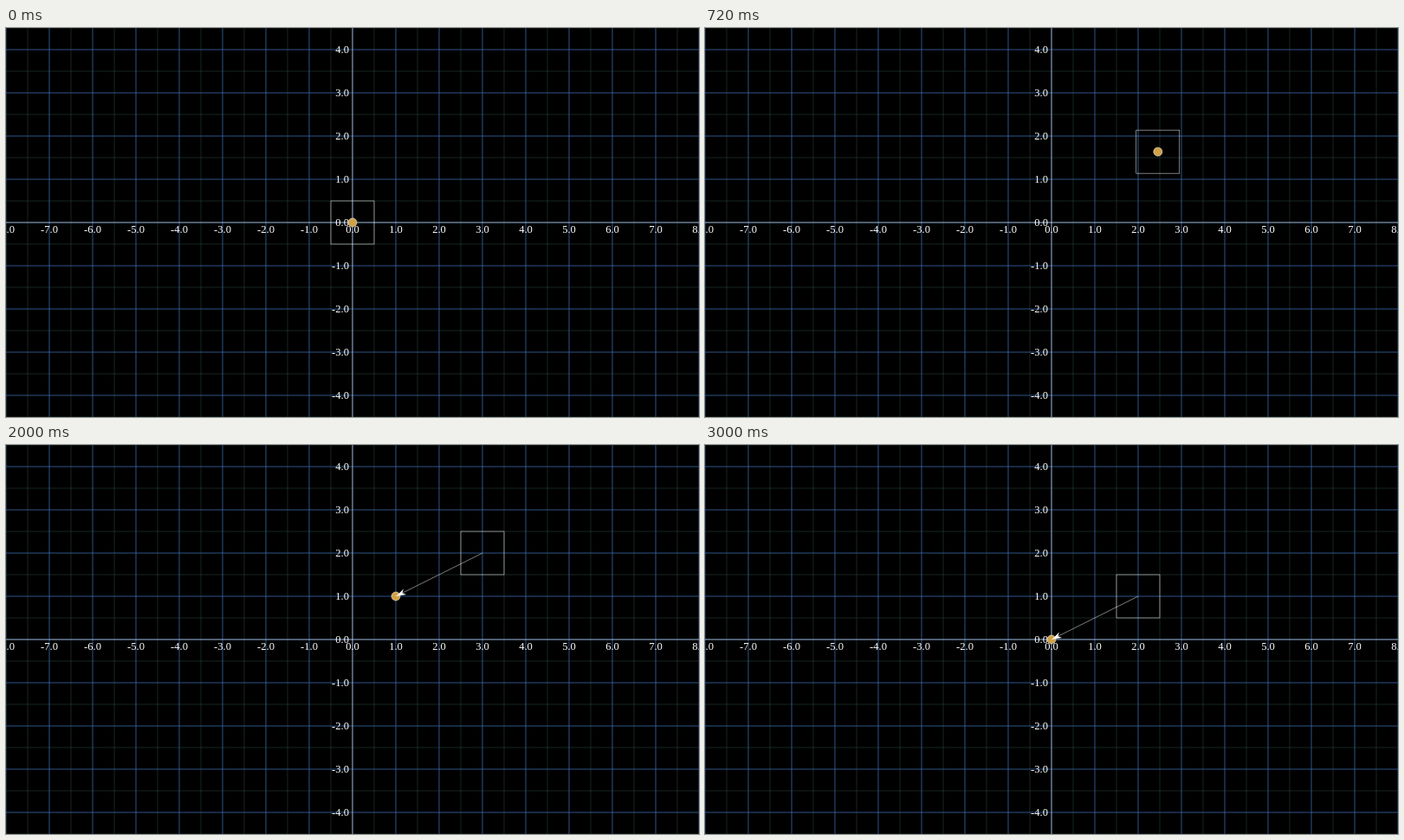
Write an HTML page with a canvas that moves like this. It is 800 by 450 pixels and loops after 4000 ms.

```html
<!DOCTYPE html>
<html lang="en">
<head>
<meta charset="utf-8">
<title>Moving frames on a grid</title>
<style>
  html, body { margin: 0; width: 100%; height: 100%; overflow: hidden; background: #000; }
  canvas { display: block; }
</style>
</head>
<body>
<canvas id="stage" width="800" height="450"></canvas>
<script>
const ctx = document.getElementById("stage").getContext("2d");
const WIDTH = 800, HEIGHT = 450, UNIT = 50, LOOP = 4000, PHASE = 1000, STEP = 20;
const START = [0, 0], CORNER = [3, 2], OFFSET = [-2, -1], RETURN = [-1, -1];
const THIN = 0.5;

const toScreen = ([x, y]) => [WIDTH / 2 + x * UNIT, HEIGHT / 2 - y * UNIT];
const add = (p, q, amount) => [p[0] + q[0] * amount, p[1] + q[1] * amount];

// Eased progress of one of the three consecutive phases.
function progress(time, phase) {
  const t = Math.min(1, Math.max(0, time / PHASE - phase));
  return (1 - Math.cos(Math.PI * t)) / 2;
}

function line(x1, y1, x2, y2, color) {
  ctx.strokeStyle = color;
  ctx.lineWidth = THIN;
  ctx.beginPath();
  ctx.moveTo(x1, y1);
  ctx.lineTo(x2, y2);
  ctx.stroke();
}

function gridLines(spacing, color) {
  for (let x = 0; x <= WIDTH; x += spacing) line(x, 0, x, HEIGHT, color);
  const top = (HEIGHT / 2) % spacing;
  for (let y = top; y <= HEIGHT; y += spacing) line(0, y, WIDTH, y, color);
}

function drawGrid() {
  ctx.fillStyle = "#000";
  ctx.fillRect(0, 0, WIDTH, HEIGHT);
  gridLines(UNIT / 2, "#2c4c44");
  gridLines(UNIT, "#3c70dc");
  line(0, HEIGHT / 2, WIDTH, HEIGHT / 2, "#fff");
  line(WIDTH / 2, 0, WIDTH / 2, HEIGHT, "#fff");

  ctx.fillStyle = "#fff";
  ctx.font = '12.6px "Liberation Serif", serif';
  ctx.textAlign = "center";
  for (let n = -8; n <= 8; n++) ctx.fillText(n.toFixed(1), toScreen([n, 0])[0], 237);
  ctx.textAlign = "right";
  for (let n = -4; n <= 4; n++) ctx.fillText(n.toFixed(1), 396, toScreen([0, n])[1] + 4);
}

function drawBox([x, y]) {
  ctx.strokeStyle = "#fff";
  ctx.lineWidth = THIN;
  ctx.strokeRect(x - UNIT / 2, y - UNIT / 2, UNIT, UNIT);
}

function drawDot([x, y]) {
  ctx.beginPath();
  ctx.arc(x, y, 5, 0, 2 * Math.PI);
  ctx.fillStyle = "#cfa147";
  ctx.fill();
  ctx.strokeStyle = "#fff";
  ctx.lineWidth = THIN;
  ctx.stroke();
}

function drawArrow(from, to) {
  const length = 11, halfWidth = 3.6, notch = 7.5;
  line(...from, ...to, "#fff");
  ctx.save();
  ctx.translate(...to);
  ctx.rotate(Math.atan2(from[1] - to[1], from[0] - to[0]));
  ctx.translate(0.8, 0);
  ctx.beginPath();
  ctx.moveTo(0, 0);
  ctx.lineTo(length, -halfWidth);
  ctx.lineTo(notch, 0);
  ctx.lineTo(length, halfWidth);
  ctx.fillStyle = "#fff";
  ctx.fill();
  ctx.restore();
}

function draw(now) {
  const time = Math.floor((now % LOOP) / STEP) * STEP;
  const box = add(add(START, CORNER, progress(time, 0)), RETURN, progress(time, 2));
  const dot = add(box, OFFSET, progress(time, 1));
  const boxCenter = toScreen(box), dotCenter = toScreen(dot);

  drawGrid();
  drawBox(boxCenter);
  drawDot(dotCenter);
  if (time > PHASE) drawArrow(boxCenter, dotCenter);
}

const startTime = performance.now();
function tick() {
  draw(performance.now() - startTime);
  requestAnimationFrame(tick);
}
tick();
</script>
</body>
</html>
```
